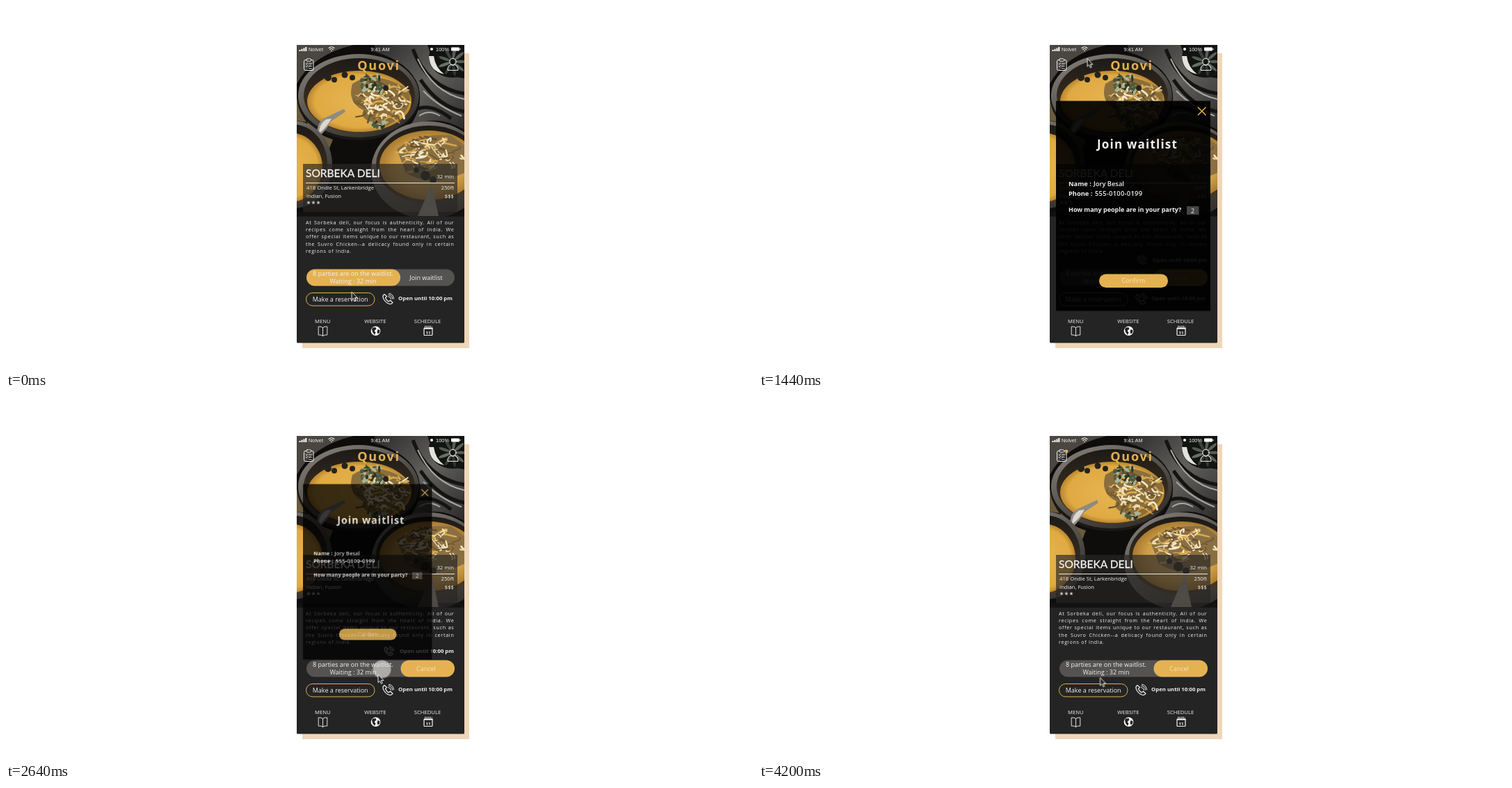
Recreate the animation shown at these times as an HTML page. Size 1074 by 522 pixels, loop 4230 ms.

```html
<!DOCTYPE html>
<html lang="en">
<head>
<meta charset="utf-8">
<title>Waitlist app</title>
<style>
html, body { margin: 0; width: 100%; height: 100%; overflow: hidden; background: #fff; }
svg { display: block; width: 100%; height: 100%; }
text, .about { font-family: "Open Sans", sans-serif; fill: #f2f2f2; }
.s { font-size: 7.7px; }
.m { font-size: 9px; }
.c { text-anchor: middle; }
.e { text-anchor: end; }
.b { font-weight: 700; }
.status { font: 7.4px "Liberation Sans", Arial, sans-serif; }
text.pale { fill: #f6e3bd; }
.gold, text.gold { fill: #e4b252; }
.line { fill: none; stroke: #f2f2f2; stroke-linecap: round; stroke-linejoin: round; }
.about { margin: 0; color: #f2f2f2; font-size: 7.2px; letter-spacing: .7px; line-height: 10.35px; }
.about div { white-space: nowrap; text-align: justify; text-align-last: justify; }
.about div:last-child { text-align-last: left; }
#overlay { transform-origin: 427px 68px; }
</style>
</head>
<body>
<svg viewBox="0 0 1074 522">
  <defs>
    <clipPath id="photoClip"><rect x="418" y="56" width="241" height="246.500"/></clipPath>
    <radialGradient id="soup"><stop offset="0" stop-color="#e6b452"/><stop offset=".85" stop-color="#e0aa42"/><stop offset="1" stop-color="#b98530"/></radialGradient>
    <radialGradient id="cream"><stop offset="0" stop-color="#d8b878"/><stop offset=".7" stop-color="#cf9f48"/><stop offset="1" stop-color="#a87a30"/></radialGradient>
    <linearGradient id="wall" x2="0" y2="1"><stop offset="0" stop-color="#1d1a17"/><stop offset="1" stop-color="#4a3a24"/></linearGradient>
    <linearGradient id="rim" x2=".7" y2="1"><stop offset="0" stop-color="#8a867f"/><stop offset=".5" stop-color="#5a5650"/><stop offset="1" stop-color="#33302c"/></linearGradient>
    <linearGradient id="cloth" x2="1" y2="1"><stop offset="0" stop-color="#2c2b2a"/><stop offset=".5" stop-color="#62605d"/><stop offset="1" stop-color="#2b2a29"/></linearGradient>
    <g id="call" class="line">
      <path stroke-width="1.200" d="M-5.500-6.500q-2.500 1.500-2 4.300Q-5.500 5 2 7.500q3 .5 4.500-2L3 2.300 .5 4Q-3 2-4-1.500l2-2z"/>
      <path stroke-width="1" d="M0-3.500Q3.500-3 4 .5M.5-5.700Q5.500-5 6.200 .3M1-7.700Q7.500-7 8 0"/>
    </g>
  </defs>

  <rect x="426" y="68" width="240" height="424" fill="#efd6b8"/>
  <rect x="418" y="56" width="241" height="428.500" rx="1.500" fill="#242424"/>

  <g clip-path="url(#photoClip)">
    <rect x="418" y="56" width="241" height="247" fill="#0e0d0c"/>
    <path d="M418 56H500Q440 70 418 112z" fill="#4a4641"/>
    <path d="M418 132Q425 178 470 192L462 212 440 168 418 165z" fill="#6a5a3c"/>
    <path d="M530 56H606Q618 100 659 104V178Q625 158 596 168L574 180Q602 150 593 115 580 80 530 66z" fill="url(#cloth)"/>
    <g fill="none" stroke="#141413" stroke-width="5"><path d="M585 62Q606 118 659 126M596 106Q622 145 659 152M592 148Q612 140 640 162"/></g>
    <g fill="none" stroke="#a9a7a3" stroke-width="2"><path d="M592 76Q614 124 659 134M600 122Q622 145 655 158M594 158Q608 148 624 158"/></g>
    <ellipse cx="642" cy="74" rx="34" ry="29" fill="#121412"/>
    <path d="M608 72Q609 94 630 98 617 88 615 72z" fill="#e2e1dc"/>
    <g id="leaves" fill="#7d8479"></g>

    <ellipse cx="506" cy="134" rx="87" ry="59" fill="#1a1816"/>
    <ellipse cx="507" cy="129" rx="87" ry="60" fill="url(#rim)"/>
    <ellipse cx="508" cy="129" rx="80" ry="54" fill="url(#wall)"/>
    <ellipse cx="508" cy="137" rx="75" ry="44" fill="url(#soup)"/>
    <path d="M498 112Q530 90 578 120 590 150 548 172 505 166 514 150 490 138 498 112z" fill="#8a6e3c"/>
    <g id="noodles" fill="none" stroke-linecap="round"></g>
    <g id="herbs"></g>
    <g fill="#24231e"><circle cx="463" cy="103" r="5"/><circle cx="472" cy="106" r="4"/><circle cx="487" cy="99" r="4.500"/><circle cx="498" cy="103" r="4"/><circle cx="546" cy="118" r="4"/></g>
    <path d="M447 187Q446 168 458 161L486 148 488 152 467 166Q461 178 450 188z" fill="#8f8b84"/>
    <path d="M450 183Q450 170 460 163L468 162Q460 176 450 183z" fill="#dcd8d0"/>

    <ellipse cx="414" cy="228" rx="55" ry="63" fill="url(#rim)"/>
    <ellipse cx="412" cy="227" rx="50" ry="57" fill="url(#wall)"/>
    <ellipse cx="408" cy="232" rx="47" ry="50" fill="url(#soup)"/>

    <ellipse cx="607" cy="236" rx="82" ry="70" fill="url(#rim)"/>
    <ellipse cx="608" cy="228" rx="76" ry="56" fill="url(#wall)"/>
    <ellipse cx="608" cy="229" rx="71" ry="50" fill="url(#cream)"/>
    <path d="M562 206Q590 182 640 186L659 200V240Q610 262 575 240z" fill="#8a6f42"/>
    <g id="noodles2" fill="none" stroke-linecap="round"></g>
    <g fill="#2d2a20"><circle cx="603" cy="244" r="7"/><circle cx="614" cy="250" r="5"/><circle cx="590" cy="236" r="4"/></g>
    <path d="M612 256L592 302H622z" fill="#a09a8f"/>
    <rect x="427" y="227" width="222" height="69" fill="#282725" opacity=".68"/>
    <rect x="418" y="296" width="241" height="7" fill="#161616" opacity=".6"/>
  </g>

  <g fill="#fff">
    <path d="M421.500 65v-2h2v2zM424.500 65v-3.200h2V65zM427.500 65v-4.600h2V65zM430.300 65v-6h2v6z"/>
    <rect x="640" y="59.500" width="12" height="5" rx="1"/><rect x="652.600" y="61" width="1" height="2"/>
    <circle cx="612" cy="62" r="2"/>
  </g>
  <path class="line" stroke-width="1.100" d="M464 60.500q4-3.500 8 0M465.500 62.500q2.500-2 5 0M467.500 64.500h1"/>
  <text class="status" x="435" y="64.700">Nolvet</text>
  <text class="status c" x="538" y="64.700">9:41 AM</text>
  <text class="status e" x="637" y="64.700">100%</text>

  <g class="line">
    <rect x="428.500" y="77.500" width="13.500" height="15" rx="2"/>
    <rect x="432" y="76" width="6.500" height="3.200" rx="1" fill="#2b2927"/>
    <path stroke-width=".9" d="M431 83l1 1 1.500-2M435.500 83h4M431 86.500l1 1 1.500-2M435.500 86.500h4M435.500 89.700h4"/>
    <circle cx="642.500" cy="80" r="4.700"/>
    <path d="M635 92q0-6.500 4.500-7.500 3 1.500 6 0 4.500 1 4.500 7.500z"/>
  </g>
  <circle id="badge" class="gold" cx="442" cy="78" r="2.300"/>
  <text class="gold c b" x="536" y="92" font-size="18" letter-spacing="1.8">Quovi</text>

  <text x="431" y="246" style="font:15.500px Lato, sans-serif" stroke="#f2f2f2" stroke-width=".3">SORBEKA DELI</text>
  <path d="M431 254.500H645" stroke="#e8e8e8"/>
  <text class="s" x="432" y="264">418 Ondle St, Larkenbridge</text>
  <text class="s" x="432" y="276">Indian, Fusion</text>
  <text class="s e" x="644" y="248">32 min</text>
  <text class="s e" x="644" y="264">250ft</text>
  <text class="s e" x="644" y="276">$$$</text>
  <g id="stars" fill="#c8c8c6"></g>

  <foreignObject x="431" y="305.500" width="213.500" height="56">
    <div class="about" xmlns="http://www.w3.org/1999/xhtml">
      <div>At Sorbeka deli, our focus is authenticity. All of our</div>
      <div>recipes come straight from the heart of India. We</div>
      <div>offer special items unique to our restaurant, such as</div>
      <div>the Suvro Chicken--a delicacy found only in certain</div>
      <div>regions of India.</div>
    </div>
  </foreignObject>

  <text id="hours" class="b" font-size="7.8" x="566" y="367.500">Open until 10:00 pm</text>
  <use id="hoursIcon" href="#call" transform="translate(550.500 365) scale(.85)"/>

  <rect x="432" y="378.500" width="213" height="24" rx="12" fill="#545351"/>
  <g id="joinState">
    <rect class="gold" x="432" y="378.500" width="135" height="24" rx="12"/>
    <text class="m c" x="604" y="394">Join waitlist</text>
  </g>
  <g id="cancelState">
    <rect class="gold" x="567.500" y="378.500" width="77.500" height="24" rx="12"/>
    <text class="m c pale" x="604" y="394">Cancel</text>
  </g>
  <text class="m c" x="499" y="388">8 parties are on the waitlist.</text>
  <text class="m c" x="499" y="398.500">Waiting : 32 min</text>

  <rect x="431.500" y="412.500" width="98.500" height="18.500" rx="9.250" fill="none" stroke="#e2b04e"/>
  <text class="m c" x="480.700" y="425">Make a reservation</text>
  <use href="#call" transform="translate(549.500 421)"/>
  <text class="b" font-size="7.8" x="564" y="423">Open until 10:00 pm</text>

  <text class="s c" x="455.300" y="456">MENU</text>
  <text class="s c" x="531" y="456">WEBSITE</text>
  <text class="s c" x="606" y="456">SCHEDULE</text>
  <path class="line" stroke-width=".9" d="M455.500 462.500q-2-2-6.300-1.500v12q4.300-.5 6.300 1.500 2-2 6.300-1.500v-12q-4.300-.5-6.300 1.500zv12"/>
  <circle cx="531.500" cy="467.300" r="6.800" fill="#fff"/>
  <path fill="#242424" d="M527 462.500l4.500-.5 1 2.500-3 2.500 2 2.500-1.500 3.500-3-4-1-4zM534.500 465l3 1-.5 4-2.500 1.500-1-3z"/>
  <path d="M601 463.500h12.500" stroke="#fff" stroke-width="2"/>
  <rect x="601" y="463" width="12" height="10.500" rx="1" class="line" stroke-width="1.200"/>
  <path d="M602 460.700h10.500" stroke="#fff" stroke-width="1.300" stroke-dasharray="1.500 1"/>
  <text class="c b" x="607" y="471.500" font-size="6">11</text>

  <g id="overlay">
    <rect x="427" y="136.500" width="222" height="302" opacity=".92"/>
    <path d="M631 145.500l11.500 11.500M642.500 145.500L631 157" stroke="#e2b04e" stroke-width="1.500"/>
    <text class="c b" x="544" y="205" font-size="17" letter-spacing="1.2">Join waitlist</text>
    <g font-size="9.300" font-weight="600">
      <text class="b" x="445" y="259">Name :</text><text x="481" y="259">Jory Besal</text>
      <text class="b" x="445" y="272.500">Phone :</text><text x="483" y="272.500" letter-spacing=".3">555-0100-0199</text>
    </g>
    <text class="m b" x="445" y="296">How many people are in your party?</text>
    <rect x="615" y="288" width="17.500" height="12" fill="#454545"/>
    <text class="m c" x="623.500" y="297.700">2</text>
    <rect class="gold" x="489" y="385.500" width="99" height="19.500" rx="9.750"/>
    <text class="m c pale" x="538.500" y="398.300">Confirm</text>
  </g>

  <g id="tap"><circle r="13" fill="#e9e7e5"/></g>
  <g id="cursor"><path d="M0 0V11.500L2.600 9.200 4.400 13.200 6.200 12.400 4.500 8.500H8z" fill="#222" stroke="#fff" stroke-width=".9"/></g>
</svg>
<script>
const LOOP = 4230;
const $ = id => document.getElementById(id);

let seed = 7;
const rand = (lo, hi) => {
  seed = (seed * 16807) % 2147483647;
  return lo + (hi - lo) * seed / 2147483647;
};
const add = (parent, tag, attrs) => {
  const el = document.createElementNS("http://www.w3.org/2000/svg", tag);
  for (const key in attrs) el.setAttribute(key, attrs[key]);
  $(parent).append(el);
};

function noodles(parent, count, cx, cy, rx, ry) {
  for (let i = 0; i < count; i++) {
    const a = rand(0, 6.28), r = Math.sqrt(rand(0, 1));
    const x = cx + rx * r * Math.cos(a), y = cy + ry * r * Math.sin(a);
    add(parent, "path", {
      d: `M${x} ${y}q${rand(-12, 12)} ${rand(-10, 10)} ${rand(-16, 16)} ${rand(-9, 9)}`,
      stroke: ["#f6e8c4", "#d9a94c", "#efdcab", "#6b5430"][i % 4],
      "stroke-width": rand(1.2, 3)
    });
  }
}
noodles("noodles", 75, 541, 138, 34, 28);
noodles("noodles2", 65, 613, 212, 44, 24);

function herbs(count, x0, x1, y0, y1) {
  for (let i = 0; i < count; i++) {
    const x = rand(x0, x1), y = rand(y0, y1);
    add("herbs", "ellipse", {
      cx: x, cy: y, rx: rand(2, 5), ry: rand(1, 2.5),
      transform: `rotate(${rand(0, 180)} ${x} ${y})`,
      fill: ["#4d5a3f", "#a3b79c", "#2e3527"][i % 3]
    });
  }
}
herbs(36, 511, 541, 100, 126);
herbs(12, 524, 546, 165, 174);

for (let i = 0; i < 9; i++) {
  const x = 642, y = 80;
  add("leaves", "ellipse", {
    cx: x + 12, cy: y, rx: 9, ry: 2.2, opacity: rand(.3, .9),
    transform: `rotate(${i * 40} ${x} ${y})`
  });
}

for (let s = 0; s < 3; s++) {
  const points = Array.from({ length: 10 }, (_, i) => {
    const r = i % 2 ? 1.2 : 3, a = i * Math.PI / 5;
    return [435 + 7 * s + r * Math.sin(a), 282.7 - r * Math.cos(a)];
  });
  add("stars", "polygon", { points: points.join(" ") });
}

const HOLD = "steps(1, end)";
function play(id, prop, steps, easing = "linear") {
  const last = steps[steps.length - 1];
  const frames = [...steps, [LOOP, last[1]]].map(([ms, value, ease = easing]) =>
    ({ offset: ms / LOOP, [prop]: value, easing: ease }));
  $(id).animate(frames, { duration: LOOP, iterations: Infinity });
}
const at = (x, y) => `translate(${x}px, ${y}px)`;

play("joinState", "opacity", [[0, 1], [960, 0]], HOLD);
play("cancelState", "opacity", [[0, 0], [960, 1]], HOLD);
play("hours", "opacity", [[0, 0], [960, 1], [3060, 0]], HOLD);
play("hoursIcon", "opacity", [[0, 0], [1020, 1], [3060, 0]], HOLD);
play("badge", "opacity", [[0, 0], [3060, 1]], HOLD);

play("overlay", "opacity", [[0, 0], [990, 0], [1080, 1], [2550, 1], [3060, 0]]);
play("overlay", "transform", [[0, "scale(1)"], [2550, "scale(1)"], [3060, "scale(.077)"]]);

play("tap", "transform", [[0, at(504, 399.5)], [1500, at(540.5, 391.5)]], HOLD);
play("tap", "opacity", [
  [0, 0], [600, 0], [660, .8], [900, .8], [990, .62], [1110, 0],
  [2130, 0], [2220, .82], [2520, .82], [2640, .6], [2760, 0]
]);

play("cursor", "opacity", [[0, 1], [630, 0], [1110, 1], [2190, 0], [2580, 1]], HOLD);
play("cursor", "transform", [
  [0, at(497, 411), "ease-out"], [450, at(504, 399)],
  [1110, at(504, 399), "ease-in-out"], [1410, at(472, 75.5)],
  [1680, at(472, 75.5), "ease-in-out"], [2130, at(540, 390)],
  [2580, at(535, 399)], [3390, at(535, 400)],
  [3630, at(535, 400), "ease-in-out"], [4140, at(490.5, 403.5)]
]);
</script>
</body>
</html>
```
